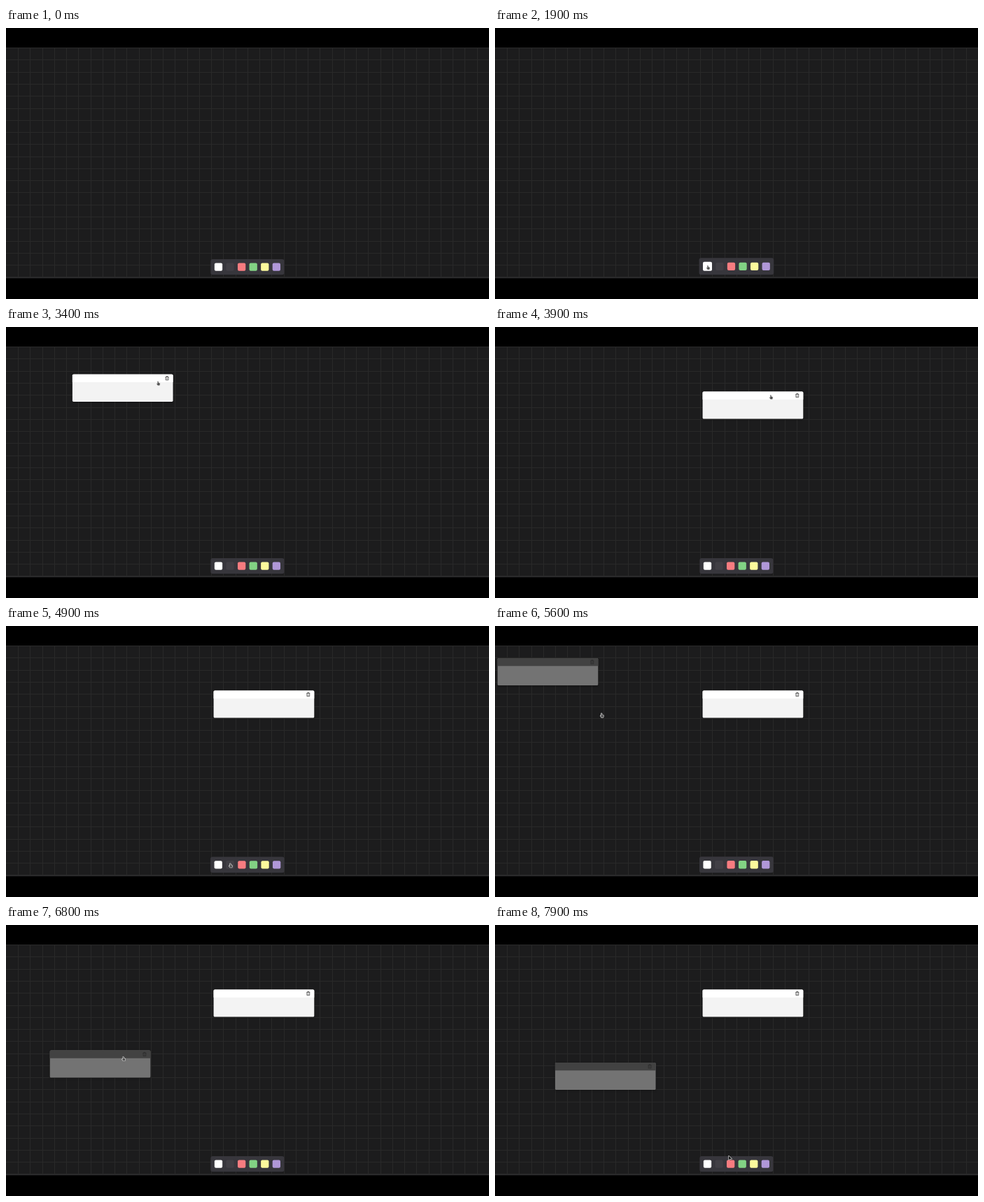
An HTML page with a canvas that plays this animation: 690 px wide and 388 px high, repeating every 8 s.

```html
<!DOCTYPE html>
<html lang="en">
<head>
<meta charset="utf-8">
<title>Sticky notes board</title>
<style>
  html, body { margin: 0; width: 100%; height: 100%; overflow: hidden; background: #000; }
  canvas { display: block; }
</style>
</head>
<body>
<canvas id="stage" width="690" height="388"></canvas>
<script>
const ctx = document.getElementById('stage').getContext('2d');
const LOOP = 8000, STEP = 100, LAG = 32, FADE = 250;
const SWATCHES = ['#ffffff', '#413f45', '#f77c80', '#82d284', '#fcf99c', '#b097d8'];

const clamp = v => Math.max(0, Math.min(1, v));
const glide = u => u * u * (3 - 2 * u);
const flick = u => 1 - (1 - u) ** 2;

// Pointer moves; bend makes the vertical part run ahead of the horizontal one
const START = [345, 175];
const MOVES = [
  { from: 1050, to: 1650, end: [304.5, 343], ease: glide, arrow: true },
  { from: 2550, to: 2990, end: [101.5, 54], ease: flick, bend: 0.9 },
  { from: 3265, to: 3870, end: [394.5, 100.5], ease: flick, bend: 1.7 },
  { from: 4150, to: 4900, end: [321, 343], ease: glide, arrow: true },
  { from: 5440, to: 5743, end: [104.7, 53], ease: flick, bend: 0.9 },
  { from: 6250, to: 7047, end: [187, 204], ease: glide, bend: 1.7 },
  { from: 7220, to: 7950, end: [338, 335.5], ease: glide, arrow: true }
];
// Each note is born from a swatch, then follows one pointer move
const NOTES = [
  { swatch: 0, hover: 1500, born: 1950, leave: 2580, drag: 2, head: '#ffffff', body: '#f3f3f3' },
  { swatch: 1, hover: 4780, born: 5050, leave: 5450, drag: 5, head: '#424242', body: '#737373' }
];

function progress(move, t) {
  const s = move.ease(clamp((t - move.from) / (move.to - move.from)));
  return [s, 1 - (1 - s) ** (move.bend || 1)];
}

function travel(i, t) {
  const start = i ? MOVES[i - 1].end : START;
  return progress(MOVES[i], t).map((s, axis) => s * (MOVES[i].end[axis] - start[axis]));
}

function box(x, y, w, h, r, fill) {
  ctx.beginPath();
  ctx.roundRect(x, y, w, h, r);
  ctx.fillStyle = fill;
  ctx.fill();
}

function drawBoard() {
  ctx.fillStyle = '#000';
  ctx.fillRect(0, 0, 690, 388);
  ctx.fillStyle = '#1c1c1d';
  ctx.fillRect(0, 28, 690, 330);
  ctx.fillStyle = '#292929';
  for (let x = 17.2; x < 690; x += 17.25) ctx.fillRect(Math.round(x), 28, 1, 330);
  for (let y = 28.2; y < 357; y += 17.27) ctx.fillRect(0, Math.round(y), 690, 1);
  ctx.fillStyle = '#2c2c2e';
  ctx.fillRect(0, 357, 690, 1.3);
}

const TRASH = new Path2D('M-2.5-1.6H2.5M-1-1.8V-2.7H1V-1.8M-1.9-1.4V2.6H1.9V-1.4M0 0V1.6');

function drawNote(note, t) {
  if (t < note.born) return;
  const [dx, dy] = travel(note.drag, t - LAG);
  ctx.save();
  ctx.translate(3.6 + dx, 46 + dy);
  ctx.globalAlpha = clamp((t - note.born) / FADE);
  ctx.shadowColor = 'rgba(0,0,0,.35)';
  ctx.shadowBlur = 3;
  ctx.shadowOffsetY = 1;
  box(0, 0, 143.7, 39.1, 1.6, note.body);
  ctx.shadowColor = 'transparent';
  box(0, 0, 143.7, 11.2, [1.6, 1.6, 0, 0], note.head);
  ctx.translate(135.2, 5.5);
  ctx.strokeStyle = '#2a2a2a';
  ctx.lineWidth = 0.7;
  ctx.stroke(TRASH);
  ctx.restore();
}

function drawToolbar(t) {
  const grow = SWATCHES.map(() => 0);
  for (const n of NOTES)
    grow[n.swatch] = 1.7 * (glide(clamp((t - n.hover) / 300)) - glide(clamp((t - n.leave) / 300)));
  const extra = grow.reduce((a, b) => a + b);
  const top = 331 - extra, height = 22.3 + extra;
  let x = 292.4 - extra / 2;
  box(x, top, 105 + extra, height, 3, '#37363c');
  x += 5.45;
  SWATCHES.forEach((color, i) => {
    const size = 11.3 + grow[i];
    box(x, top + (height - size) / 2, size, size, 2, color);
    x += size + 5.27;
  });
}

const ARROW = new Path2D('M-2-3V2.6L-.5 1.3 2.2 1Z');
const HAND = new Path2D('M-1.1-2.7Q-.5-3.2-.1-2.5L.2-.8 1.9-.3Q2.4 0 2.1 1.2L1.6 2.7H-.8L-2.3.6Q-2.1-.1-1 .4Z');

function drawPointer(t) {
  const i = MOVES.findLastIndex(m => t > m.from);
  if (i < 0) return;
  const move = MOVES[i], [dx, dy] = travel(i, t), [x, y] = i ? MOVES[i - 1].end : START;
  const arrow = move.arrow && t < move.to;
  const shape = arrow ? ARROW : HAND;
  ctx.save();
  ctx.translate(x + dx, y + dy);
  ctx.lineJoin = 'round';
  ctx.lineWidth = 1.3;
  ctx.strokeStyle = '#d8d8d8';
  ctx.stroke(shape);
  ctx.fillStyle = arrow ? '#151515' : '#505050';
  ctx.fill(shape);
  ctx.restore();
}

function frame() {
  const t = Math.floor(performance.now() % LOOP / STEP) * STEP;
  drawBoard();
  NOTES.forEach(note => drawNote(note, t));
  drawToolbar(t);
  drawPointer(t);
  requestAnimationFrame(frame);
}
frame();
</script>
</body>
</html>
```
